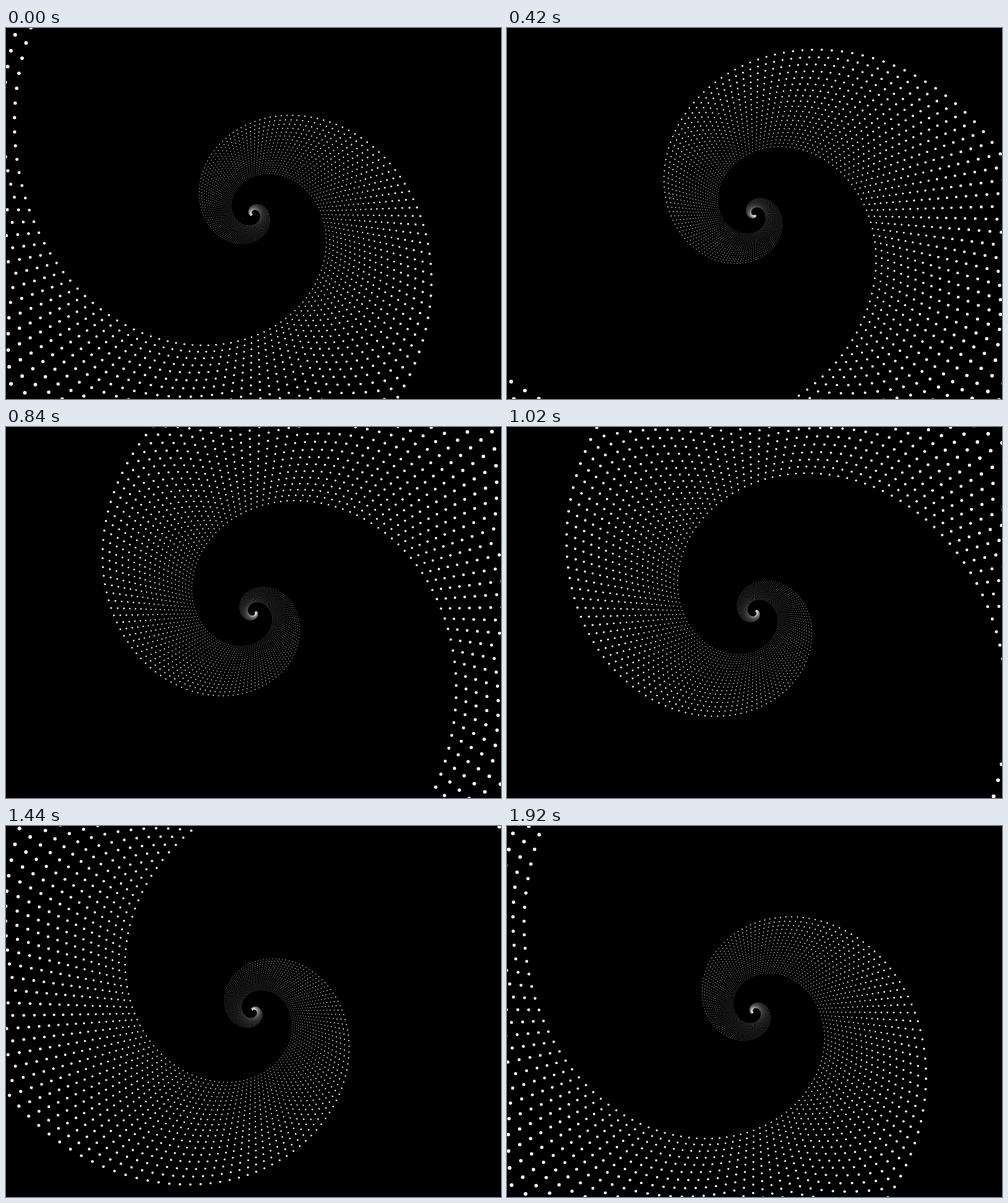
An HTML page with a canvas for the animation above (1950 ms loop, 800x600 px).

```html
<!DOCTYPE html>
<html lang="en">
<head>
<meta charset="utf-8">
<title>Dotted spiral</title>
<style>
  html, body { margin: 0; width: 100%; height: 100%; overflow: hidden; background: #000; }
  canvas { display: block; width: 800px; height: 600px; }
</style>
</head>
<body>
<canvas id="stage" width="800" height="600"></canvas>
<script>
const ctx = document.getElementById('stage').getContext('2d');

const STEP_MS = 30, STEPS = 65;
const CX = 400, CY = 300;
const RAY_STEP = Math.PI / 60;   // 120 rays per turn
const RAY_GROWTH = 1.02;         // radius factor from one ray to the next
const ARM_GROWTH = Math.exp(0.047);
const ARMS = 20;
const BASE_RADIUS = 416.2, BASE_ANGLE = 201.88 * Math.PI / 180;
const FIRST_RAY = -262, LAST_RAY = 11;

const dots = [];
for (let ray = FIRST_RAY; ray <= LAST_RAY; ray++) {
  for (let arm = 0; arm < ARMS; arm++) {
    const radius = BASE_RADIUS * RAY_GROWTH ** ray * ARM_GROWTH ** arm;
    if (radius > 510) break;
    dots.push({
      radius,
      angle: BASE_ANGLE + ray * RAY_STEP,
      size: Math.hypot(0.0063 * radius, 0.17)
    });
  }
}

function drawDot(x, y, size) {
  if (size < 0.6) {
    // Square of equal area keeps sub-pixel dots evenly lit
    const side = size * Math.sqrt(Math.PI);
    ctx.fillRect(x - side / 2, y - side / 2, side, side);
    return;
  }
  ctx.beginPath();
  ctx.arc(x, y, size, 0, 2 * Math.PI);
  ctx.fill();
}

function draw(step) {
  const turn = -2 * Math.PI * step / STEPS;
  ctx.fillStyle = '#000';
  ctx.fillRect(0, 0, 800, 600);
  ctx.fillStyle = '#fff';
  for (const { radius, angle, size } of dots) {
    drawDot(CX + radius * Math.cos(angle + turn), CY + radius * Math.sin(angle + turn), size);
  }
}

const start = performance.now();
let shown = -1;

function tick() {
  const elapsed = Math.max(0, performance.now() - start);
  const step = Math.floor(elapsed / STEP_MS) % STEPS;
  if (step !== shown) draw(shown = step);
  requestAnimationFrame(tick);
}
tick();
</script>
</body>
</html>
```
